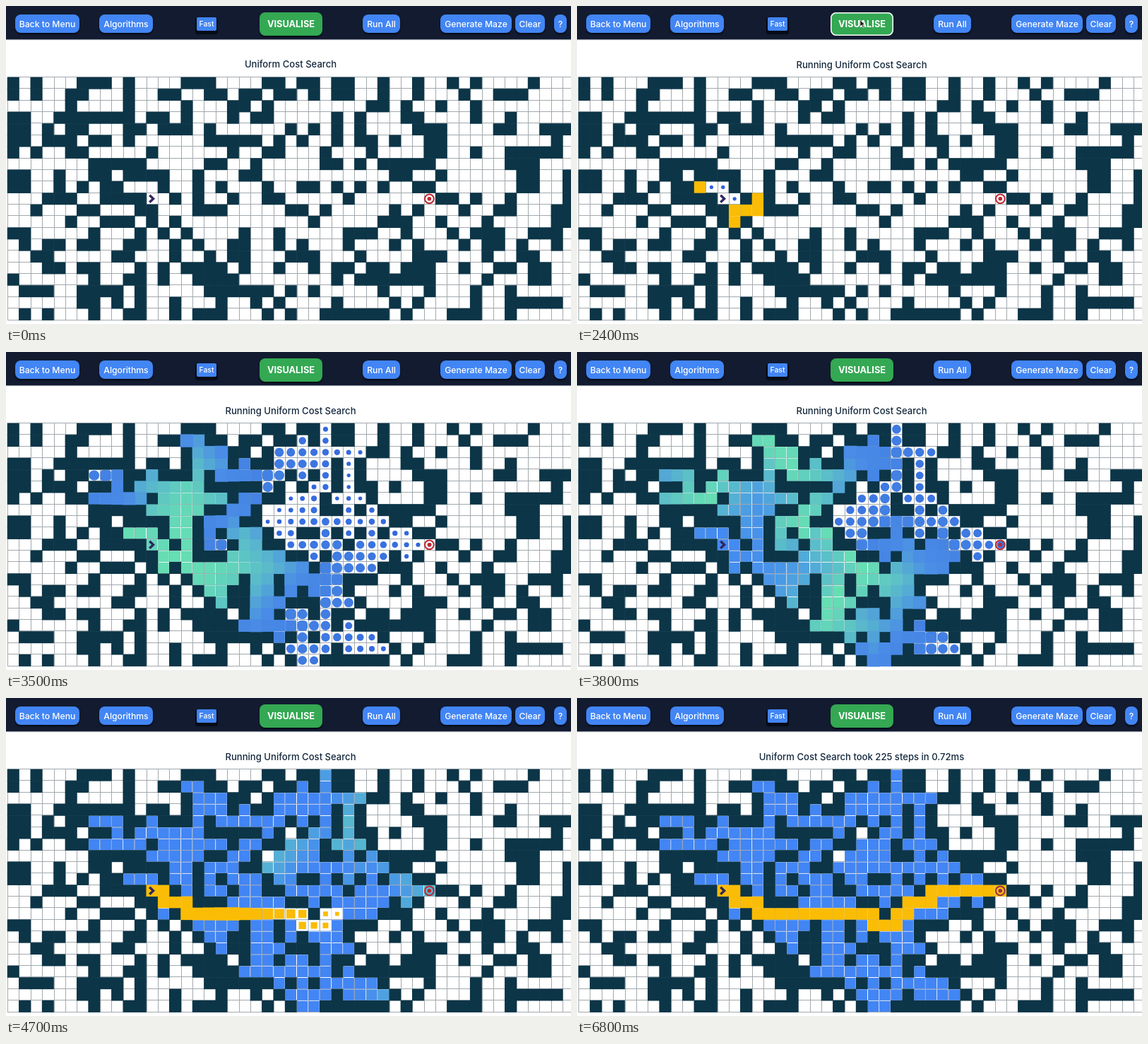
These frames come from a looping animation (800x450 px, 6900 ms). An HTML page with a canvas:

```html
<!DOCTYPE html>
<html lang="en">
<head>
<meta charset="utf-8">
<title>Path search</title>
<style>
html, body { margin: 0; width: 800px; height: 450px; overflow: hidden; background: #fff; }
body { position: relative; font-family: Inter, "Open Sans", sans-serif; }
header { position: absolute; left: 0; top: 0; width: 800px; height: 47px; background: #121b30; box-shadow: 0 1px 1px #8d929c; }
header span {
  position: absolute; top: 12px; height: 26px; line-height: 27px; border-radius: 8px;
  background: #4285f4; color: #fff; text-align: center; white-space: nowrap;
  font-size: 12.2px; font-weight: 500; box-shadow: 0 2px 2px #070b16;
}
header .speed { top: 16px; height: 19px; line-height: 19px; border-radius: 2px; font-size: 10.4px; box-shadow: 0 3px 1px 2px #070b16; }
header .run { top: 9px; height: 33px; line-height: 34px; background: #34a853; font-size: 12.8px; font-weight: 700; }
header .run.hover { box-shadow: inset 0 0 0 1.5px #fff; }
#title { position: absolute; left: 0; width: 806px; height: 20px; line-height: 20px; text-align: center; font-size: 13.1px; font-weight: 500; color: #14283c; }
canvas { position: absolute; left: 0; top: 0; }
</style>
</head>
<body>
<header>
  <span style="left:13px;width:91px">Back to Menu</span>
  <span style="left:132px;width:76px">Algorithms</span>
  <span class="speed" style="left:270px;width:28px">Fast</span>
  <span class="run" id="run" style="left:359px;width:89px">VISUALISE</span>
  <span style="left:505px;width:53px">Run All</span>
  <span style="left:615px;width:101px">Generate Maze</span>
  <span style="left:721px;width:42px">Clear</span>
  <span style="left:776px;width:18px">?</span>
</header>
<div id="title"></div>
<canvas id="stage" width="800" height="450"></canvas>
<script>
const MAZE = [
  '#.#...###.#....###....##.##.##..#..#..#.#....#...',
  '#.#..##...#..##..##.##.##.#.##..#..#...#..###....',
  '.....#....#....#...##.#........##.#..#..#........',
  '##..#######.##.#...#.##.....#.#...##....#..#.....',
  '##.#.##...##.###.#......#.#.#.#....###....##..###',
  '##.###.##.#......#####.#.#..#.##.#..##.........#.',
  '#.#..##.....#......#..##...#...#....##..#..#####.',
  '.......#####.....##..#.....##.#.#####......###...',
  '##..#..##.####..#...##...........##..#......##..#',
  '##..#.#.##...#..#.#...#..##.#.#.#..##.......##..#',
  '...###..####..#.#..#..##.....#.......##.#..#....#',
  '..#...##...##...###.....##.#.....#.#...#..##...##',
  '.....#..###.#.#...........#.....###..#...#.....##',
  '##.....#...#.#.#....#..#.....###..#...#.###..###.',
  '.#.##.##..##..#.#..##..#.#...#...#.#...#.##.#..#.',
  '..##.....##...#..#.##...###...#....###...#..##...',
  '...##.##...#.#.####.#..#..#.##.##.###..#..##.##..',
  '#......#..##.#..####........#.#######....#...##..',
  '.###..####.#.....######.#.#.....#...#...#..#.....',
  '......##.#.#..#...#..#.#....#....#.#....#..#####.',
  '.#.#...#..##..#.###...#.#..######.#...###..#.....'
];
const COLS = 49, ROWS = 21, W = 16.38, H = 16.36, X0 = 2, Y0 = 101;
const LOOP = 6900, TICK = 100;
const SEARCH = { from: 2355, step: 5, flash: 30, life: 1500 };
const PATH = { from: 3810, step: 44.5, grow: 500, settle: 250 };
const DIRS = [[0, -1], [-1, 0], [0, 1], [1, 0]];
const START = { x: 12, y: 10, d: 0 }, GOAL = { x: 36, y: 10 };
const WALL = '#0c3547', GOLD = '#fbbc05';

const ctx = document.getElementById('stage').getContext('2d');
const title = document.getElementById('title');
const run = document.getElementById('run');

const key = (x, y) => y * COLS + x;
const lerp = (a, b, u) => a + (b - a) * u;
const clamp = u => Math.max(0, Math.min(1, u));
const easeOut = u => 1 - (1 - u) ** 1.6;
const mix = (a, b, u) => `rgb(${a.map((v, i) => Math.round(lerp(v, b[i], u)))})`;

// Breadth-first: equal step costs make this a uniform cost search.
function search() {
  const seen = new Map([[key(START.x, START.y), START]]);
  const order = [START];
  let limit = Infinity;
  for (let i = 0; i < order.length; i++) {
    const c = order[i];
    for (const [dx, dy] of DIRS) {
      const x = c.x + dx, y = c.y + dy, k = key(x, y);
      if (!MAZE[y] || MAZE[y][x] !== '.' || seen.has(k)) continue;
      const n = { x, y, d: c.d + 1 };
      seen.set(k, n);
      order.push(n);
      if (x === GOAL.x && y === GOAL.y) limit = n.d;
      if (n.d > limit) return { seen, order };
    }
  }
  return { seen, order };
}

function trace(seen) {
  const path = [];
  let c = seen.get(key(GOAL.x, GOAL.y));
  while (c) {
    path.unshift(c);
    const at = c;
    c = DIRS.map(([dx, dy]) => seen.get(key(at.x + dx, at.y + dy))).find(n => n && n.d === at.d - 1);
  }
  return path;
}

const { seen, order } = search();
const path = trace(seen);

function block(c, w, h, color, radius = 0) {
  ctx.fillStyle = color;
  ctx.beginPath();
  ctx.roundRect(X0 + (c.x + 0.5) * W - w / 2, Y0 + (c.y + 0.5) * H - h / 2, w, h, radius);
  ctx.fill();
}

function drawGrid() {
  ctx.fillStyle = '#fff';
  ctx.fillRect(0, Y0, 800, ROWS * H);
  ctx.strokeStyle = '#a2a9ae';
  ctx.lineWidth = 1;
  ctx.beginPath();
  for (let x = 0; x < COLS; x++) {
    const px = Math.round(X0 + x * W) + 0.5;
    ctx.moveTo(px, Y0);
    ctx.lineTo(px, Y0 + ROWS * H);
  }
  for (let y = 0; y <= ROWS; y++) {
    const py = Math.round(Y0 + y * H) - 0.5;
    ctx.moveTo(X0, py);
    ctx.lineTo(800, py);
  }
  ctx.stroke();
  MAZE.forEach((row, y) => [...row].forEach((s, x) => {
    if (s === '#') block({ x, y }, W + 0.6, H + 0.6, WALL);
  }));
}

const DOT = [46, 96, 220], SKY = [74, 140, 230], MINT = [102, 222, 180], BLUE = [66, 133, 244];

function drawVisited(c, age) {
  if (age < 0) return;
  if (age < SEARCH.flash) return block(c, W, H, GOLD);
  const u = age / SEARCH.life;
  let scale = 1, color;
  if (u < 0.5) {
    scale = lerp(0.3, 1.2, u * 2);
    color = mix(DOT, SKY, u * 2);
  } else if (u < 0.75) {
    const e = easeOut((u - 0.5) * 4);
    scale = lerp(1.2, 1, e);
    color = mix(SKY, MINT, e);
  } else {
    color = mix(MINT, BLUE, easeOut(clamp((u - 0.75) * 4)));
  }
  const w = (W - 1) * scale, h = (H - 1) * scale;
  block(c, w, h, color, h / 2 * clamp((620 - age) / 90));
}

function drawPath(c, age) {
  if (age < 0) return;
  const scale = age < PATH.grow
    ? lerp(0.34, 1.16, age / PATH.grow)
    : lerp(1.16, 1, clamp((age - PATH.grow) / PATH.settle));
  if (scale < 1) block(c, W - 1, H - 1, '#fff');
  block(c, W * scale, H * scale, GOLD);
}

function drawIcons(t) {
  const cx = X0 + (START.x + 0.5) * W, cy = Y0 + (START.y + 0.5) * H;
  ctx.strokeStyle = '#31285f';
  ctx.lineWidth = 3.4;
  ctx.beginPath();
  ctx.moveTo(cx - 3.5, cy - 5);
  ctx.lineTo(cx + 1.8, cy);
  ctx.lineTo(cx - 3.5, cy + 5);
  ctx.stroke();

  const done = t >= PATH.from + PATH.step * (path.length - 1);
  const gx = X0 + (GOAL.x + 0.5) * W - 0.5, gy = cy;
  ctx.strokeStyle = ctx.fillStyle = done ? '#983052' : '#bd2833';
  ctx.lineWidth = 2;
  ctx.beginPath();
  ctx.arc(gx, gy, 6.4, 0, 7);
  ctx.stroke();
  ctx.beginPath();
  ctx.arc(gx, gy, 2.8, 0, 7);
  ctx.fill();
}

function drawCursor(t) {
  if (t < 1300 || t > 2800) return;
  const y = 20 + 16 * (1 - clamp((t - 1300) / 300)) ** 2;
  ctx.fillStyle = '#26171c';
  ctx.strokeStyle = '#fff';
  ctx.lineWidth = 0.7;
  ctx.beginPath();
  [[0, 0], [0, 9], [2.2, 7], [4, 11], [5.4, 10.3], [3.8, 6.6], [6.6, 6.5]]
    .forEach(([dx, dy]) => ctx.lineTo(401 + dx, y + dy));
  ctx.closePath();
  ctx.fill();
  ctx.stroke();
}

function render(t) {
  ctx.clearRect(0, 0, 800, 450);
  const name = 'Uniform Cost Search';
  title.textContent = t < 2300 ? name : t < 6100 ? 'Running ' + name : name + ' took 225 steps in 0.72ms';
  title.style.top = (t < 2300 ? 72 : 73) + 'px';
  run.classList.toggle('hover', t >= 1300 && t <= 2800);

  drawGrid();
  order.forEach((c, i) => {
    if (i || t > 2450) drawVisited(c, t - SEARCH.from - i * SEARCH.step);
  });
  path.forEach((c, i) => drawPath(c, t - PATH.from - i * PATH.step));
  drawIcons(t);
  drawCursor(t);
}

let origin;
function loop(now) {
  origin ??= now;
  render(Math.floor(((now - origin) % LOOP) / TICK) * TICK);
  requestAnimationFrame(loop);
}
render(0);
requestAnimationFrame(loop);
</script>
</body>
</html>
```
